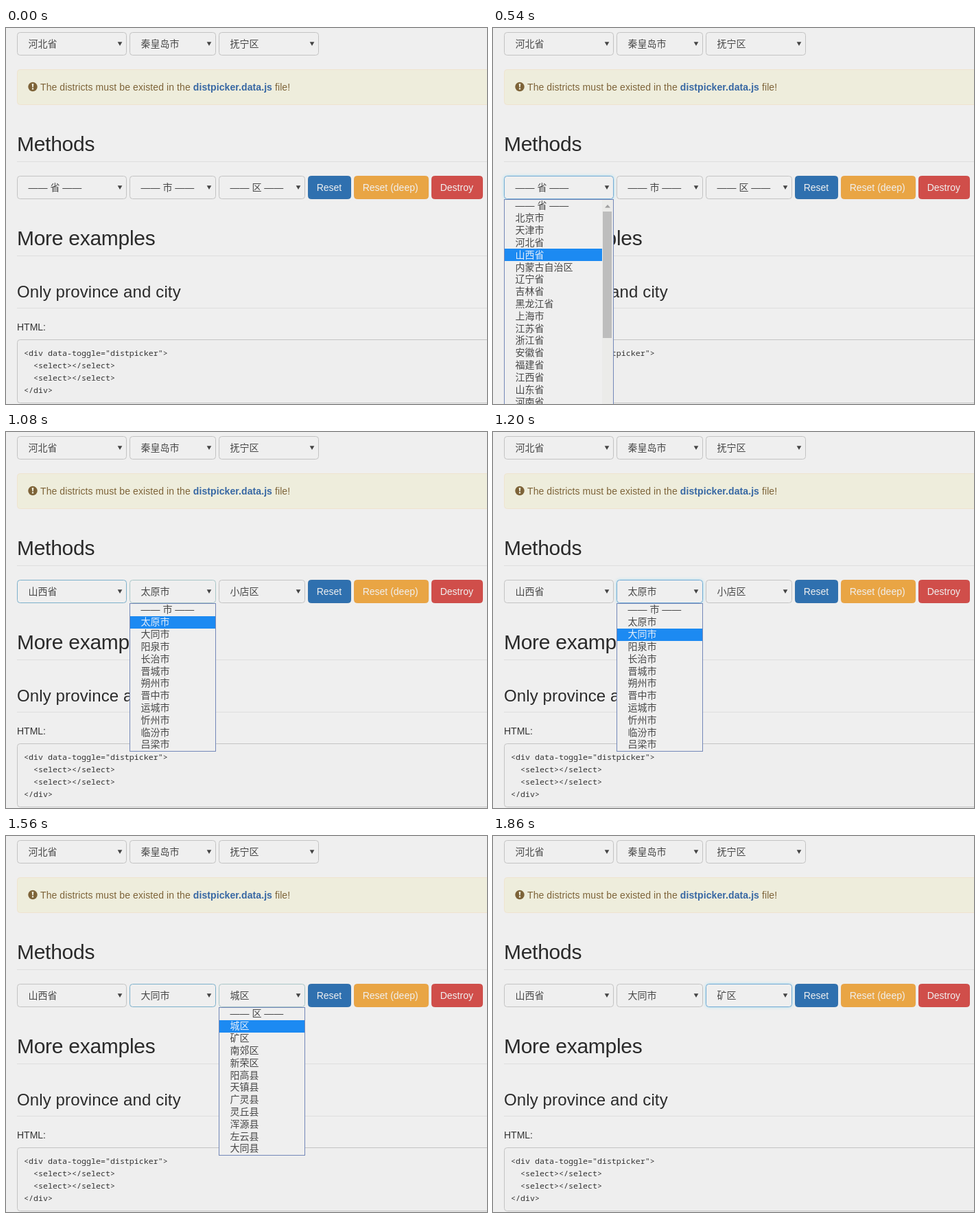
Recreate the animation shown at these times as an HTML page. Size 701 px wide and 547 px high, loop 2.7 s.

```html
<!DOCTYPE html>
<html lang="en">
<head>
<meta charset="utf-8">
<title>District picker</title>
<style>
  html, body { margin: 0; width: 100%; height: 100%; overflow: hidden; background: #efefef; }
  svg { display: block; width: 701px; height: 547px; overflow: hidden; }
  text { font: 14px "Liberation Sans", "Noto Sans CJK SC", "Noto Sans CJK", sans-serif; fill: #333; white-space: pre; }
  .h2 { font-size: 30px; letter-spacing: -.28px; fill: #2a2a2a; }
  .h3 { font-size: 24px; letter-spacing: .12px; fill: #2a2a2a; }
  .code { font: 11.667px "Noto Sans Mono", "DejaVu Sans Mono", monospace; }
  .rule { stroke: #dedede; }
  .alert { fill: #eeeddc; stroke: #efe3cf; }
  .warn { fill: #7d6338; letter-spacing: .09px; }
  .link { font-weight: bold; fill: #3767a3; }
  .button text { fill: #f0f0f0; }
  .box { fill: #efefef; stroke: #c3c3c3; }
  .box.rise { stroke: #a9c6c8; }
  .box.fall { stroke: #7cb0cb; }
  .box.on { stroke: #74abd4; filter: drop-shadow(0 0 2px #a8dff0); }
  .value, .menu text { fill: #484848; }
  .arrow { fill: #444; }
  .menu .panel { fill: #efefef; stroke: #7387b8; }
  .menu .mark { fill: #1c8af2; }
  .menu text.picked { fill: #e4eefa; }
</style>
</head>
<body>
<svg id="stage" viewBox="0 0 701 547">
  <rect class="alert" x="16.5" y="60.5" width="720" height="51" rx="4"/>
  <circle class="warn" cx="39" cy="85.5" r="6.7"/>
  <path d="M37.7 81h2.6l-.5 5.2h-1.6zM37.9 87.3h2.2v2.1h-2.2z" fill="#eeeddc"/>
  <text class="warn" x="50" y="91">The districts must be existed in the <tspan class="link">distpicker.data.js</tspan> file!</text>

  <text class="h2" x="16" y="179">Methods</text>
  <text class="h2" x="16" y="316">More examples</text>
  <text class="h3" x="16" y="392">Only province and city</text>
  <path class="rule" d="M16 194.5H701M16 331.5H701M16 407.5H701"/>

  <text x="16" y="440">HTML:</text>
  <rect x="16.5" y="453.5" width="720" height="92" rx="4" fill="#eee" stroke="#c3c3c3"/>
  <text class="code" x="26" y="477">&lt;div data-toggle="distpicker"&gt;</text>
  <text class="code" x="26" y="495">  &lt;select&gt;&lt;/select&gt;</text>
  <text class="code" x="26" y="513">  &lt;select&gt;&lt;/select&gt;</text>
  <text class="code" x="26" y="531">&lt;/div&gt;</text>
</svg>
<script>
const LOOP = 2700, ROW = 17.82;
const stage = document.getElementById('stage');

function add(parent, tag, attrs, text) {
  const el = document.createElementNS('http://www.w3.org/2000/svg', tag);
  for (const key in attrs) el.setAttribute(key, attrs[key]);
  if (text) el.textContent = text;
  return parent.appendChild(el);
}

function addSelect(x, y, width, label) {
  const box = add(stage, 'rect', { class: 'box', x: x + .5, y: y + .5, width: width - 1, height: 33, rx: 4 });
  const value = add(stage, 'text', { class: 'value', x: x + 16.5, y: y + 22 }, label);
  add(stage, 'path', { class: 'arrow', d: `M${x + width - 13.3} ${y + 14.3}h6.6l-3.3 5.6z` });
  return { box, value };
}

function addButton(x, width, label, fill, stroke) {
  const g = add(stage, 'g', { class: 'button' });
  add(g, 'rect', { x: x + .5, y: 215.5, width: width - 1, height: 33, rx: 4, fill, stroke });
  add(g, 'text', { x: x + 12.7, y: 237 }, label);
}

function addMenu(x, width, options, scrolls) {
  const g = add(stage, 'g', { class: 'menu' });
  const height = scrolls ? 320 : 215;
  add(g, 'rect', { class: 'panel', x: x + .5, y: 249.5, width: width - 1, height });
  const mark = add(g, 'rect', { class: 'mark', x: x + 1, width: width - (scrolls ? 18 : 2), height: 18 });
  const rows = options.map((label, i) =>
    add(g, 'text', { x: x + 16.5, y: 263.4 + i * ROW }, label));
  if (scrolls) {
    const left = x + width - 17;
    add(g, 'rect', { x: left, y: 250, width: 16, height: 310, fill: '#ebebe9' });
    add(g, 'path', { d: `M${left + 4} 261.5h8l-4 -4.5z`, fill: '#a0a0a0' });
    add(g, 'rect', { x: left + 1, y: 267, width: 13, height: 184, fill: '#bdbdbd' });
  }
  return { g, mark, rows };
}

addSelect(16, 6, 160, '河北省');
addSelect(180, 6, 126, '秦皇岛市');
addSelect(310, 6, 146, '抚宁区');
addButton(440, 63, 'Reset', '#2f70af', '#3470aa');
addButton(507, 109, 'Reset (deep)', '#e9a544', '#e7a348');
addButton(620, 75, 'Destroy', '#d04e4a', '#cc4f4b');

// Each track lists [start time, state]; a picked row of -1 means a closed menu.
const pickers = [
  {
    x: 16, width: 160, scrolls: true,
    options: '—— 省 ——,北京市,天津市,河北省,山西省,内蒙古自治区,辽宁省,吉林省,黑龙江省,上海市,江苏省,浙江省,安徽省,福建省,江西省,山东省,河南省',
    value: [[0, '—— 省 ——'], [720, '山西省']],
    focus: [[0, ''], [360, 'rise'], [420, 'on'], [1080, 'fall'], [1140, '']],
    picked: [[0, -1], [360, 0], [420, 1], [480, 3], [540, 4], [720, -1]]
  },
  {
    x: 180, width: 126,
    options: '—— 市 ——,太原市,大同市,阳泉市,长治市,晋城市,朔州市,晋中市,运城市,忻州市,临汾市,吕梁市',
    value: [[0, '—— 市 ——'], [720, '太原市'], [1320, '大同市']],
    focus: [[0, ''], [1080, 'rise'], [1140, 'on'], [1560, 'fall'], [1620, '']],
    picked: [[0, -1], [1080, 1], [1200, 2], [1320, -1]]
  },
  {
    x: 310, width: 126,
    options: '—— 区 ——,城区,矿区,南郊区,新荣区,阳高县,天镇县,广灵县,灵丘县,浑源县,左云县,大同县',
    value: [[0, '—— 区 ——'], [720, '小店区'], [1320, '城区'], [1860, '矿区']],
    focus: [[0, ''], [1560, 'rise'], [1620, 'on']],
    picked: [[0, -1], [1560, 1], [1680, 2], [1860, -1]]
  }
];

for (const p of pickers) p.select = addSelect(p.x, 215, p.width, p.value[0][1]);
for (const p of pickers) p.menu = addMenu(p.x, p.width, p.options.split(','), p.scrolls);

const stateAt = (track, t) => track.filter(([start]) => start <= t).pop()[1];

function render(t) {
  for (const { select, menu, value, focus, picked } of pickers) {
    select.value.textContent = stateAt(value, t);
    select.box.setAttribute('class', 'box ' + stateAt(focus, t));
    const row = stateAt(picked, t);
    menu.g.style.display = row < 0 ? 'none' : '';
    menu.mark.setAttribute('y', Math.round(250 + Math.max(row, 0) * ROW));
    menu.rows.forEach((el, i) => el.classList.toggle('picked', i === row));
  }
}

const begin = performance.now();
function tick() {
  render((performance.now() - begin) % LOOP);
  requestAnimationFrame(tick);
}
tick();
</script>
</body>
</html>
```
